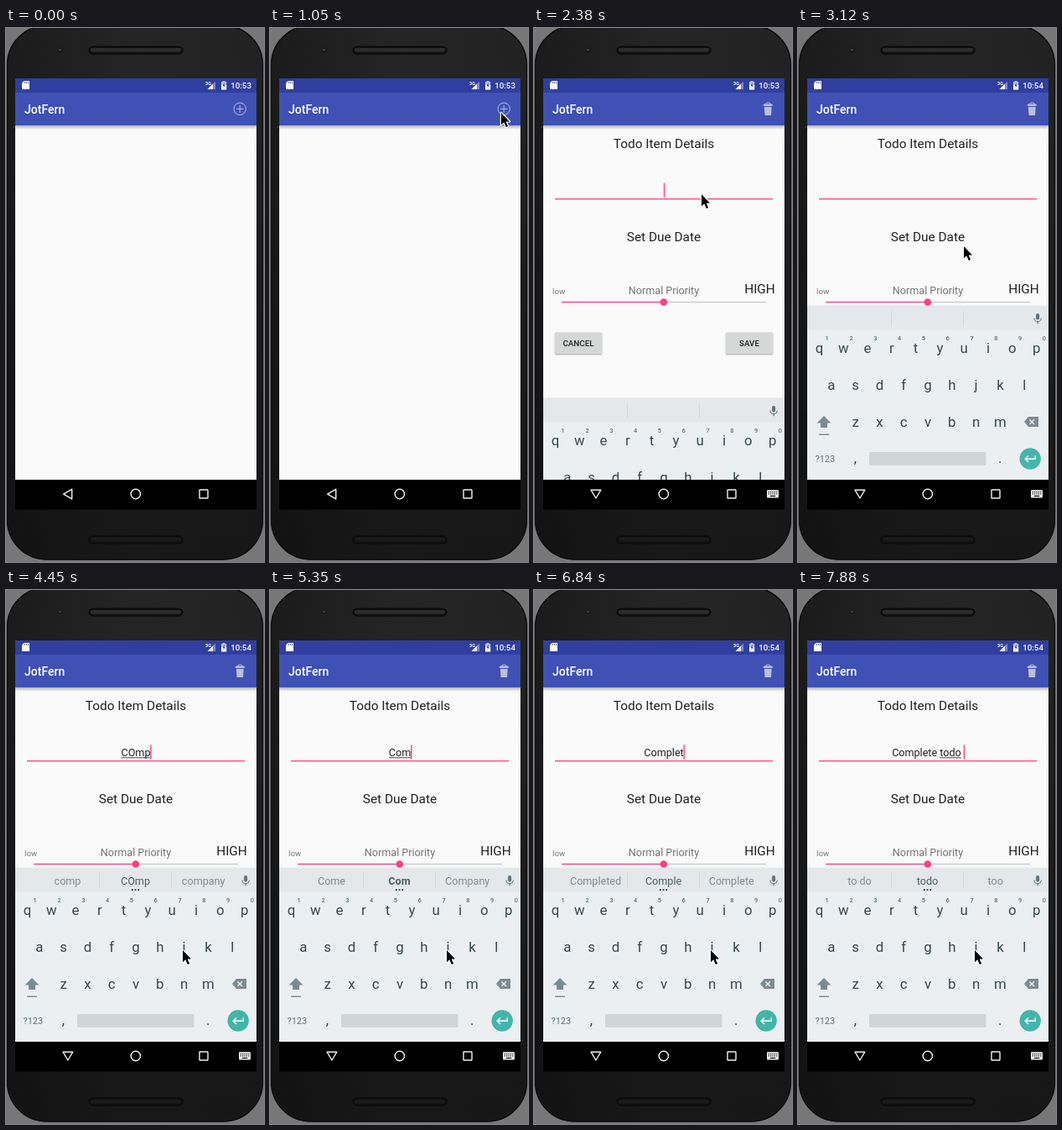
These frames come from a looping animation (308 by 636 pixels, 8 s). An HTML page with a canvas:

```html
<!DOCTYPE html>
<html lang="en">
<head>
<meta charset="utf-8">
<title>Todo list demo</title>
<style>
  html, body { margin: 0; width: 100%; height: 100%; overflow: hidden; background: #777; }
  canvas { display: block; width: 308px; height: 636px; }
</style>
</head>
<body>
<canvas id="stage"></canvas>
<script>
const W = 308, H = 636, LOOP = 8000;
const canvas = document.getElementById('stage');
const dpr = window.devicePixelRatio || 1;
canvas.width = W * dpr;
canvas.height = H * dpr;
const c = canvas.getContext('2d');

const INK = '#212121', PINK = '#ff4081', KEY = '#37474f', ICON = '#7c8a91';

// Each row starts at its time and holds until the next one.
const CURSOR = [
  [0, null], [750, [295, 130]], [900, [285, 112]], [1050, [276, 101]], [1200, [271, 96]],
  [1640, [262, 111]], [1790, [236, 150]], [1930, [212, 186]], [2080, [200, 198]],
  [2530, [198, 234]], [2670, [198, 260]], [3270, [211, 429]]
];
const PAGE = [[0, null], [1640, 3], [1790, 0]];
const KEYBOARD = [[0, null], [2380, 110], [2530, 24], [2670, 0]];
const TYPED = [
  [0, ''], [3560, 'C'], [3860, 'CO'], [4150, 'COm'], [4300, 'COmp'],
  [4600, 'COm'], [4750, 'CO'], [4900, 'C'], [5050, 'Co'], [5200, 'Com'],
  [5950, 'Comp'], [6250, 'Compl'], [6550, 'Comple'], [6840, 'Complet'], [6980, 'Complete'],
  [7130, 'Complete '], [7280, 'Complete t'], [7430, 'Complete to'],
  [7580, 'Complete tod'], [7730, 'Complete todo'], [7880, 'Complete todo ']
];
const HINTS = [
  [0, ''], [3710, 'Can|C|Could'], [4000, 'Congrats|CO|Co'], [4300, 'com|COm|come'],
  [4450, 'comp|COmp|company'], [4750, 'com|COm|come'], [4900, 'Co|CO|Com'],
  [5050, 'Can|C|Could'], [5200, 'Come|Co|Could'], [5350, 'Come|*Com|Company'],
  [6100, 'Company|Comp|Complete'], [6400, 'Complete|Compl|Completed'],
  [6700, 'Completed|Comple|Complete'], [6980, 'Completed|*Complete|Completely'],
  [7130, 'the|my|a'], [7430, 'the|t|to'], [7580, 'the|*to|too'], [7730, 'to do|tod|today'],
  [7880, 'to do|todo|too']
];

function at(rows, t) {
  let value = rows[0][1];
  for (const [start, v] of rows) if (t >= start) value = v;
  return value;
}

function rect(x, y, w, h, fill) {
  c.fillStyle = fill;
  c.fillRect(x, y, w, h);
}

function round(x, y, w, h, r, fill, stroke, line = 1) {
  c.beginPath();
  c.roundRect(x, y, w, h, r);
  if (fill) { c.fillStyle = fill; c.fill(); }
  if (stroke) { c.strokeStyle = stroke; c.lineWidth = line; c.stroke(); }
}

function disc(x, y, r, fill, stroke, line = 1) {
  round(x - r, y - r, 2 * r, 2 * r, r, fill, stroke, line);
}

function poly(points, fill, stroke, line = 1, closed = true) {
  c.beginPath();
  for (let i = 0; i < points.length; i += 2) c.lineTo(points[i], points[i + 1]);
  if (closed) c.closePath();
  if (fill) { c.fillStyle = fill; c.fill(); }
  if (stroke) { c.strokeStyle = stroke; c.lineWidth = line; c.stroke(); }
}

function text(s, x, y, size, color, align = 'center', weight = 400) {
  c.font = `${weight} ${size}px Roboto, sans-serif`;
  c.textAlign = align;
  c.fillStyle = color;
  c.fillText(s, x, y);
}

function speaker(y, fill) {
  round(99, y, 112, 9, 4.5, '#111', '#050505');
  round(101, y + 2, 108, 4.5, 2.2, fill);
}

function drawPhone() {
  rect(0, 0, W, H, '#777');
  const g = c.createLinearGradient(0, 0, W, 0);
  g.addColorStop(0, '#1b1b1b');
  g.addColorStop(0.5, '#252525');
  g.addColorStop(1, '#222');
  round(0.5, -4, 307, 638, 48, g, '#8a8a8a');
  const shade = c.createLinearGradient(0, 60, 0, H);
  shade.addColorStop(0, 'rgba(0,0,0,0)');
  shade.addColorStop(1, 'rgba(0,0,0,.35)');
  round(1.5, -3, 305, 636, 47, shade, '#0b0b0b', 1.5);
  disc(65, 26, 3, '#191919');
  disc(64.5, 26, 1.3, '#4a4a4a');
  speaker(22, '#2c2c2c');
  speaker(605, '#1a1a1a');
}

function drawStatus(time) {
  poly([21.5, 63, 28, 63, 28, 73, 19, 73, 19, 65.5], '#fff');
  for (const x of [22.2, 24.2, 26.2]) rect(x, 64, 0.8, 2, '#303f9f');
  text('3G', 238, 67.5, 5.5, '#fff', 'left', 700);
  poly([250, 63.5, 250, 73, 240.5, 73], 'rgba(255,255,255,.4)');
  poly([247, 66.5, 247, 73, 240.5, 73], '#fff');
  rect(258.5, 63, 3, 1.5, '#b8bde0');
  rect(257, 64, 6.2, 4, '#b8bde0');
  rect(257, 68, 6.2, 5.5, '#fff');
  poly([260.6, 65, 258.8, 69, 259.9, 69, 259.7, 71.6, 261.6, 68, 260.5, 68], '#303f9f');
  text(time, 293, 72, 9.8, '#fff', 'right', 500);
}

function drawBar(dy) {
  const g = c.createLinearGradient(0, 116 + dy, 0, 121 + dy);
  g.addColorStop(0, 'rgba(0,0,0,.28)');
  g.addColorStop(1, 'rgba(0,0,0,0)');
  rect(11, 116 + dy, 288, 5, g);
  rect(11, 60, 288, dy, '#27348b');
  rect(11, 60 + dy, 288, 17, '#303f9f');
  rect(11, 77 + dy, 288, 39, '#3f51b5');
  text('JotFern', 22, 101.5 + dy, 14, '#fff', 'left', 500);
}

function drawPlus() {
  const tone = '#bcbfd6';
  disc(279.2, 96.3, 7.2, null, tone);
  rect(278.7, 92, 1, 8.6, tone);
  rect(274.9, 95.8, 8.6, 1, tone);
}

function drawTrash(y) {
  const tone = '#bdc0da';
  round(277, y - 7.5, 4.6, 3, 1, null, tone);
  round(273.8, y - 6, 11, 2.6, 1, tone);
  poly([274.8, y - 2.6, 283.8, y - 2.6, 283, y + 7.5, 275.6, y + 7.5], tone);
}

function drawButton(label, x) {
  c.save();
  c.shadowColor = 'rgba(0,0,0,.35)';
  c.shadowBlur = 2 * dpr;
  c.shadowOffsetY = dpr;
  round(x, 362.5, 56, 25.5, 1.5, '#d6d7d7');
  c.restore();
  text(label, x + 28, 379, 9.8, INK, 'center', 500);
}

function drawInput(s, caret) {
  c.font = '400 12.6px Roboto, sans-serif';
  const w = c.measureText(s).width, x = 155 - w / 2;
  text(s, x, 198, 12.6, INK, 'left');
  const word = s.trimEnd();
  const from = word.lastIndexOf(' ') + 1;
  // The underline drops out for a moment while the word is recomposed.
  if (word && word !== 'Complet' && s !== 'Complete ') {
    const left = c.measureText(s.slice(0, from)).width;
    rect(x + left, 199.4, c.measureText(word.slice(from)).width, 0.8, INK);
  }
  if (caret) rect(x + w - 0.2, 184.5, 1.4, 17, PINK);
  rect(25, 203, 260, 1.3, PINK);
}

function drawForm(t, dy) {
  c.save();
  c.translate(0, dy);
  text('Todo Item Details', 155, 143, 15.4, INK);
  drawInput(at(TYPED, t), t < 3120 || t >= 3560);
  text('Set Due Date', 155, 254, 15.4, INK);
  text('low', 22, 317, 9.8, '#757575', 'left');
  text('Normal Priority', 155, 317, 12.6, '#757575');
  text('HIGH', 287.8, 316, 15.4, INK, 'right');
  rect(155, 325.8, 122, 1.4, '#cbcbcb');
  rect(33, 325.8, 122, 1.4, PINK);
  disc(154.8, 326.5, 4.3, PINK);
  drawButton('CANCEL', 25);
  drawButton('SAVE', 229);
  c.restore();
}

function drawHints(line) {
  rect(111, 337, 1, 18, '#d3d9dc');
  rect(197, 337, 1, 18, '#d3d9dc');
  if (line) {
    line.split('|').forEach((word, i) => {
      const bold = word[0] === '*';
      text(word.replace('*', ''), [73.5, 154.5, 235.7][i], 351, 12.6,
        i === 1 ? '#4f5f67' : '#7f8b91', 'center', bold ? 700 : 400);
    });
    for (const x of [150.8, 154.5, 158.2]) disc(x, 357.2, 1.1, KEY);
  }
  round(284.1, 340, 4, 7.5, 2, '#5f7079');
  c.beginPath();
  c.arc(286.1, 345.5, 4.2, 0, Math.PI);
  c.strokeStyle = '#5f7079';
  c.lineWidth = 1.1;
  c.stroke();
  rect(285.5, 349.5, 1.2, 2.8, '#5f7079');
}

function keyRow(letters, x, y) {
  [...letters].forEach((ch, i) => text(ch, x + i * 28.8, y, 16.8, KEY));
}

function drawKeyboard(dy, line) {
  c.save();
  c.beginPath();
  c.rect(11, 60, 288, 478);
  c.clip();
  c.translate(0, dy);
  rect(11, 330.5, 288, 1.5, 'rgba(0,0,0,.08)');
  rect(11, 332, 288, 28, '#e4e8ea');
  rect(11, 359.5, 288, 178.5, '#eceff1');
  drawHints(line);

  keyRow('qwertyuiop', 25.4, 387);
  keyRow('asdfghjkl', 39.8, 431);
  keyRow('zxcvbnm', 68.6, 475);
  for (let i = 0; i < 10; i++) {
    text((i + 1) % 10, 34.7 + i * 28.8, 372, 7.4, '#62727a', 'center', 500);
  }

  poly([31, 462, 39.5, 470.5, 35, 470.5, 35, 476, 27, 476, 27, 470.5, 22.5, 470.5], ICON);
  rect(25, 483.5, 12, 1.4, ICON);
  poly([275, 463, 287, 463, 287, 475, 275, 475, 270, 469], ICON);
  poly([276.3, 466.3, 282, 472], null, '#eceff1', 1.4, false);
  poly([282, 466.3, 276.3, 472], null, '#eceff1', 1.4, false);

  text('?123', 32.3, 517, 11, '#5f7079');
  text(',', 68.3, 518, 16.8, KEY);
  text('.', 241.2, 518, 16.8, KEY);
  round(85, 505, 139.5, 16, 2, '#d0d5d8');
  disc(277.2, 513, 12.7, '#45b5aa');
  poly([283.3, 509.3, 283.3, 513.3, 271.5, 513.3], null, '#fff', 1.4, false);
  poly([275, 509.6, 271.3, 513.3, 275, 517], null, '#fff', 1.4, false);
  c.restore();
}

function drawNav(top, typing) {
  rect(11, top, 288, 573.5 - top, '#000');
  const tip = typing
    ? [68, 550.2, 79.8, 550.2, 73.9, 560]
    : [78.7, 549.3, 78.7, 560.9, 68.6, 555.1];
  c.lineJoin = 'round';
  poly(tip, null, '#eee', 1.4);
  c.lineJoin = 'miter';
  disc(154.8, 555, 5.7, null, '#eee', 1.5);
  round(231, 550, 10, 10, 0.5, null, '#eee', 1.4);
  if (!typing) return;
  round(278, 550.2, 14, 9.3, 1, '#eee');
  for (let i = 0; i < 5; i++) {
    rect(279.6 + i * 2.4, 552, 1.2, 1.2, '#000');
    rect(279.6 + i * 2.4, 554.3, 1.2, 1.2, '#000');
  }
  rect(281.8, 556.9, 6.4, 1.1, '#000');
}

function drawCursor([x, y]) {
  const arrow = [0, 0, 0, 14.2, 3.3, 11.2, 5.8, 17, 8.1, 16, 5.7, 10.4, 10, 10.4];
  c.save();
  c.translate(x, y);
  c.lineJoin = 'round';
  poly(arrow, null, '#fff', 2.4);
  poly(arrow, '#000');
  c.restore();
}

function draw(t) {
  c.setTransform(dpr, 0, 0, dpr, 0, 0);
  drawPhone();
  rect(11, 60, 288, 482, '#fafafa');

  const page = at(PAGE, t), kb = at(KEYBOARD, t);
  const dy = page || 0;
  if (page !== null) drawForm(t, dy);
  drawBar(dy);
  if (page === null) drawPlus();
  else drawTrash(96.5 + dy);
  drawStatus(t < 2530 ? '10:53' : '10:54');
  if (kb !== null) drawKeyboard(kb, at(HINTS, t));
  drawNav(538 + dy, kb !== null);

  const pos = at(CURSOR, t);
  if (pos) drawCursor(pos);
}

const begin = performance.now();
function tick() {
  draw((performance.now() - begin) % LOOP);
  requestAnimationFrame(tick);
}
tick();
</script>
</body>
</html>
```
